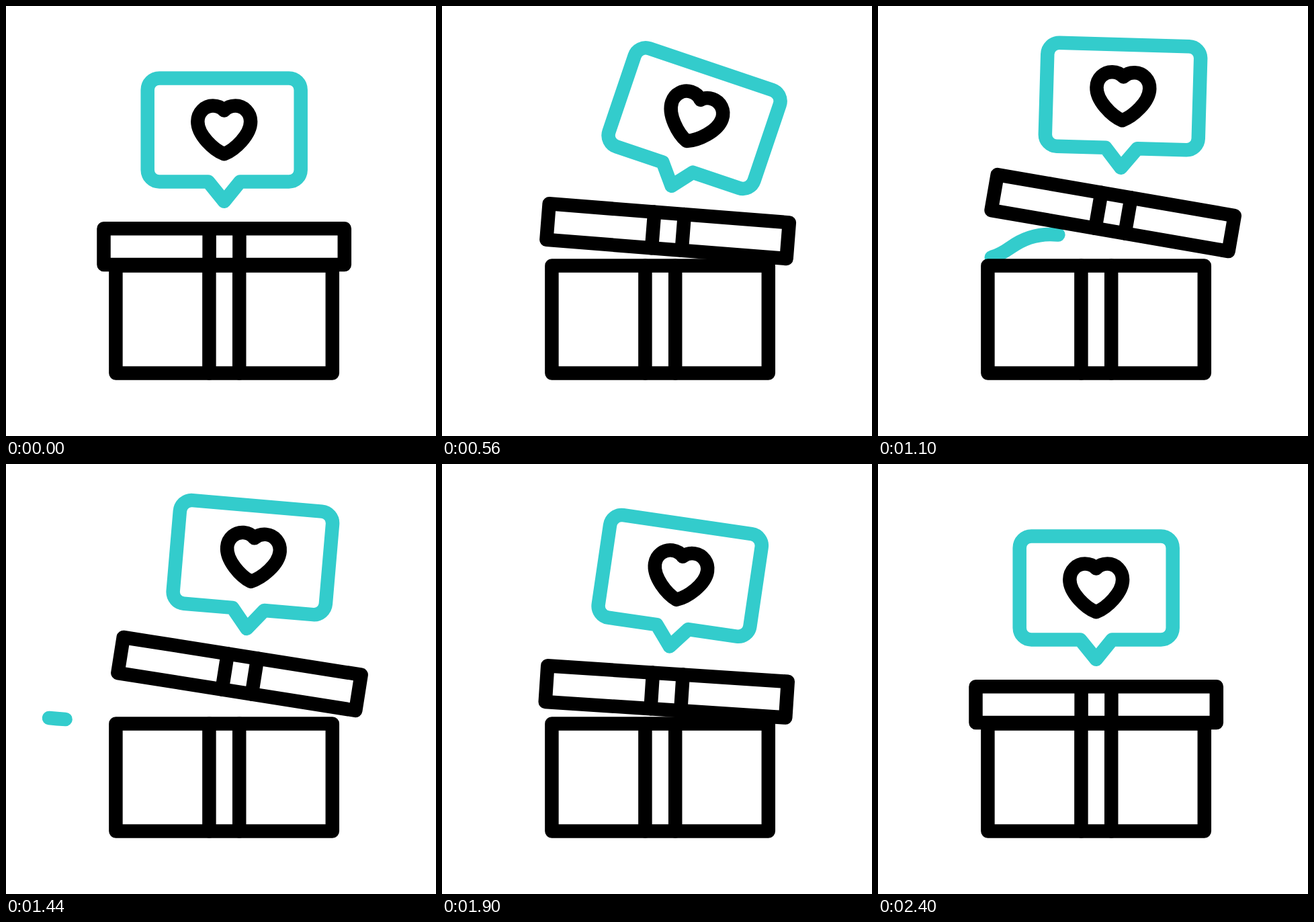
Write an HTML page that moves like this. It is 640 px wide and 640 px high and loops after 2.42 s.

```html
<!DOCTYPE html>
<html lang="en">
<head>
<meta charset="utf-8">
<title>Gift box</title>
<style>
  html, body { margin: 0; width: 100%; height: 100%; overflow: hidden; background: #fff; }
  svg { display: block; width: 100vw; height: 100vh; }
</style>
</head>
<body>
<svg viewBox="0 0 640 640" fill="none" stroke="#000" stroke-width="20.5" stroke-linecap="round" stroke-linejoin="round">
  <g stroke="#33cccc">
    <path id="ribbonA" d="M300 398C284 382 258 372 240 361C216 346 190 340 160 340C128 340 104 352 77 358"/>
    <path id="ribbonB" d="M327 402C326 392 324 384 321.5 376.5C312 356 292 343 268 340.5C240 337.6 216 346 198 359C188 366 180 371 169 374C143 381 100 382 64 378"/>
  </g>
  <g id="box">
    <path fill="#fff" d="M163.4 386.5H485.8V546.5H163.4Z"/>
    <path d="M302.4 386.5V546.5M347.2 386.5V546.5"/>
  </g>
  <g id="lid">
    <path fill="#fff" d="M145.5 331.2H503.8V385H145.5Z"/>
    <path d="M302.6 331.2V385M347.4 331.2V385"/>
  </g>
  <g id="bubble">
    <path stroke="#33cccc" d="M324.7 290.7L301 261.5H228.2A17.5 17.5 0 0 1 210.7 244V124.9A17.5 17.5 0 0 1 228.2 107.4H421.2A17.5 17.5 0 0 1 438.7 124.9V244A17.5 17.5 0 0 1 421.2 261.5H348.4Z"/>
    <path d="M324.7 155.5C320.5 151 314.5 148.6 308 148.6C295.5 148.6 285.3 158.8 285.3 172C285.3 192 309 214 324.7 220.3C340.4 214 364.1 192 364.1 172C364.1 158.8 353.9 148.6 341.4 148.6C334.9 148.6 328.9 151 324.7 155.5Z"/>
  </g>
</svg>
<script>
  const LOOP = 2420, STEP = 20, HALF = 1200;
  const el = id => document.getElementById(id);
  const lid = el('lid'), bubble = el('bubble');

  // Smooth 0..1 ramp between two times
  function ramp(t, from, to) {
    const s = Math.min(1, Math.max(0, (t - from) / (to - from)));
    return s * s * (3 - 2 * s);
  }

  // Rises from 0 to 1 and falls back
  const swing = (t, from, peak, to) => t < peak ? ramp(t, from, peak) : 1 - ramp(t, peak, to);

  function makeRibbon(id, headStart, tailStart, duration) {
    const path = el(id), length = path.getTotalLength();
    return t => {
      const head = length * ramp(t, headStart, headStart + duration);
      const tail = length * ramp(t, tailStart, tailStart + duration);
      const size = head - tail;
      path.style.display = size > 0.1 ? '' : 'none';
      path.setAttribute('stroke-dasharray', `${size} ${length * 2}`);
      path.setAttribute('stroke-dashoffset', -tail);
    };
  }

  const ribbons = [
    makeRibbon('ribbonA', 499, 612, 470),
    makeRibbon('ribbonB', 651, 828, 742)
  ];

  function draw(t) {
    const open = swing(t, 0, HALF, 2 * HALF);
    const tilt = t < HALF
      ? 19.5 * swing(t, 0, 640, HALF)
      : 10.4 * swing(t, HALF, 1700, 2 * HALF);
    lid.setAttribute('transform',
      `translate(${25.5 * open} ${-51 * open}) rotate(${10 * open} 324.7 358.1)`);
    bubble.setAttribute('transform',
      `translate(${37.5 * open} ${-51 * open}) rotate(${tilt} 324.7 290.7)`);
    ribbons.forEach(update => update(t));
  }

  const start = performance.now();
  function tick() {
    const t = (performance.now() - start) % LOOP;
    draw(Math.floor(t / STEP) * STEP);
    requestAnimationFrame(tick);
  }
  tick();
</script>
</body>
</html>
```
